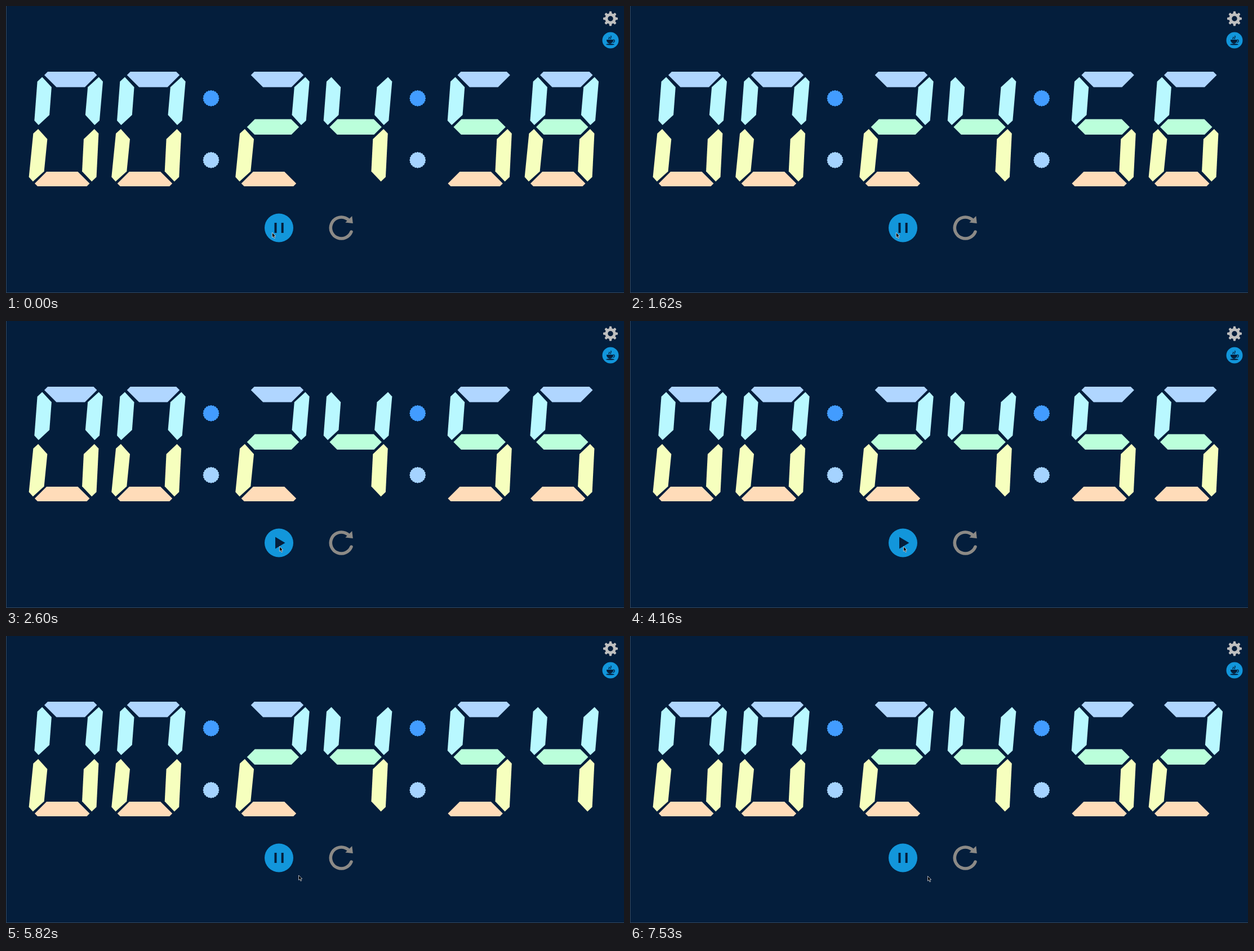
Recreate the animation shown at these times as an HTML page with a canvas. Size 1097x511 px, loop 8000 ms.

```html
<!DOCTYPE html>
<html lang="en">
<head>
<meta charset="utf-8">
<title>Countdown</title>
<style>
html, body { margin: 0; width: 100%; height: 100%; overflow: hidden; background: #041e3c; }
canvas { display: block; }
</style>
</head>
<body>
<canvas id="stage" width="1097" height="511"></canvas>
<script>
const ctx = document.getElementById('stage').getContext('2d');
const LOOP = 8000;
const NAVY = '#041e3c', BLUE = '#1296db', GRAY = '#8c8a86';
const TAU = Math.PI * 2;

// Joints of the leftmost digit: top, middle, bottom; left and right
const TL = [64.5, 123], TR = [165, 123];
const ML = [57.5, 215.5], MR = [157, 215.5];
const BL = [47.5, 316], BR = [152, 316];
const GAP = 3.5, OUTER = 8, INNER = 18;
const ACROSS = [0, 1], SIDEWAYS = [1, 0];

// Six-sided bar from p to q, reaching lo and hi along n, with mitred ends
function bar(p, q, n, lo, hi) {
  const len = Math.hypot(q[0] - p[0], q[1] - p[1]);
  const u = [(q[0] - p[0]) / len, (q[1] - p[1]) / len];
  const corner = (from, dir, d) =>
    [0, 1].map(k => from[k] + dir * u[k] * (GAP + Math.abs(d)) + n[k] * d);
  return [
    corner(p, 1, 0), corner(p, 1, -lo), corner(q, -1, -lo),
    corner(q, -1, 0), corner(q, -1, hi), corner(p, 1, hi)
  ].flat();
}

const SEGMENTS = {
  a: ['#b0d6ff', bar(TL, TR, ACROSS, 6, 21.5)],
  b: ['#b9f8ff', bar(TR, MR, SIDEWAYS, INNER, OUTER)],
  c: ['#f6ffbe', bar(MR, BR, SIDEWAYS, INNER, OUTER)],
  d: ['#ffdcb9', bar(BL, BR, ACROSS, 21, 5)],
  e: ['#f6ffbe', bar(ML, BL, SIDEWAYS, OUTER, INNER)],
  f: ['#b9f8ff', bar(TL, ML, SIDEWAYS, OUTER, INNER)],
  g: ['#bbffdb', bar(ML, MR, ACROSS, 14, 13.5)]
};
const LIT = ['abcdef', 'bc', 'abged', 'abgcd', 'fgbc', 'afgcd', 'afgcde', 'abc', 'abcdefg', 'abcdfg'];
const PITCH = 146.67;
const SLOTS = [0, 1, 2.5, 3.5, 5, 6];

const PAUSED = [2600, 4680];
const RESUME = 5530;

// Pointer stops: [start time, x, y]
const STOPS = [
  [0, 472, 403], [1740, 475, 403], [2020, 479, 401], [2170, 481, 401], [2600, 485, 401],
  [5400, 487, 398], [5530, 498, 404.5], [5680, 500, 412], [5820, 519, 425.5],
  [5980, 526, 422], [6820, 528, 427]
];

// Up to three ticks counted from a start time
function ticks(t, start, step) {
  return Math.min(3, Math.max(0, Math.floor((t - start) / step) + 1));
}

function secondsAt(t) {
  return 58 - ticks(t, 590, 1005) - ticks(t, RESUME, 1000);
}

function trace(pts) {
  ctx.beginPath();
  for (let i = 0; i < pts.length; i += 2) ctx.lineTo(pts[i], pts[i + 1]);
  ctx.closePath();
}

function poly(pts, color) {
  trace(pts);
  ctx.fillStyle = color;
  ctx.fill();
}

// Closed outline around a centre with radius r(angle)
function radial(x, y, r, color) {
  const pts = [];
  for (let i = 0; i < 160; i++) {
    const a = i / 160 * TAU;
    pts.push(x + r(a) * Math.cos(a), y + r(a) * Math.sin(a));
  }
  poly(pts, color);
}

function disc(x, y, r, color) {
  ctx.beginPath();
  ctx.arc(x, y, r, 0, TAU);
  ctx.fillStyle = color;
  ctx.fill();
}

function rect(x, y, w, h, color) {
  ctx.fillStyle = color;
  ctx.fillRect(x, y, w, h);
}

function digit(value, slot) {
  ctx.save();
  ctx.translate(slot * PITCH, 0);
  for (const key of LIT[value]) poly(SEGMENTS[key][1], SEGMENTS[key][0]);
  ctx.restore();
}

function colon(x) {
  const scallop = a => 14 + 0.5 * Math.cos(20 * a);
  radial(x, 164.3, scallop, '#429cff');
  radial(x, 274.3, scallop, '#a5d3ff');
}

function gear(x, y) {
  const tooth = a => 11.3 + Math.max(-1.7, Math.min(1.7, 4 * Math.cos(8 * a)));
  radial(x, y, tooth, '#bfbfbf');
  disc(x, y, 4.7, NAVY);
}

function cup(x, y) {
  disc(x, y, 14.5, BLUE);
  ctx.save();
  ctx.translate(x, y);
  ctx.fillStyle = ctx.strokeStyle = NAVY;
  ctx.lineWidth = 1.3;
  ctx.beginPath();
  ctx.moveTo(-7, -1);
  ctx.lineTo(5, -1);
  ctx.bezierCurveTo(5, 8, -7, 8, -7, -1);
  ctx.fill();
  ctx.beginPath();
  ctx.arc(5, 1.3, 2.2, -1.6, 1.9);
  ctx.stroke();
  ctx.beginPath();
  ctx.ellipse(-0.5, 7.3, 7.5, 1.2, 0, 0, TAU);
  ctx.fill();
  for (const [sx, sy] of [[-2.5, -6], [0.5, -8]]) {
    ctx.beginPath();
    ctx.moveTo(sx, -2);
    ctx.bezierCurveTo(sx - 2, -4, sx + 2.5, sy + 2, sx, sy);
    ctx.stroke();
  }
  ctx.restore();
}

function button(x, y, paused) {
  disc(x, y, 25.5, BLUE);
  if (paused) {
    poly([x - 6.5, y - 10.5, x + 11, y, x - 6.5, y + 10.5], NAVY);
  } else {
    for (const dx of [-8, 4.2]) rect(x + dx, y - 9, 4, 18, NAVY);
  }
}

function reload(x, y) {
  ctx.strokeStyle = GRAY;
  ctx.lineWidth = 5.6;
  ctx.lineCap = 'round';
  ctx.beginPath();
  ctx.arc(x, y, 19, 0.38, TAU - 0.78);
  ctx.stroke();
  ctx.lineCap = 'butt';
  poly([x + 19, y - 21, x + 20.5, y - 8, x + 7, y - 9.5], GRAY);
}

function pointer(t) {
  const [, x, y] = STOPS.findLast(stop => stop[0] <= t);
  ctx.save();
  ctx.translate(x + 0.5, y + 0.5);
  trace([0, 0, 0, 8.6, 2, 6.9, 3.5, 10.3, 5, 9.7, 3.6, 6.3, 6.2, 6.2]);
  ctx.fillStyle = '#000';
  ctx.fill();
  ctx.strokeStyle = '#d8dce2';
  ctx.lineWidth = 0.8;
  ctx.stroke();
  ctx.restore();
}

function draw(t) {
  rect(0, 0, 1097, 511, NAVY);
  rect(0, 0, 1, 511, '#34485f');
  rect(0, 510, 1097, 1, '#34485f');

  const text = '0024' + secondsAt(t);
  SLOTS.forEach((slot, i) => digit(+text[i], slot));
  colon(364);
  colon(364 + 2.5 * PITCH);

  gear(1073, 22.5);
  cup(1073, 61);
  button(484.5, 395, t >= PAUSED[0] && t < PAUSED[1]);
  reload(595.3, 395);
  pointer(t);
}

const begin = performance.now();
function frame(now) {
  draw(Math.max(0, now - begin) % LOOP);
  requestAnimationFrame(frame);
}
draw(0);
requestAnimationFrame(frame);
</script>
</body>
</html>
```
